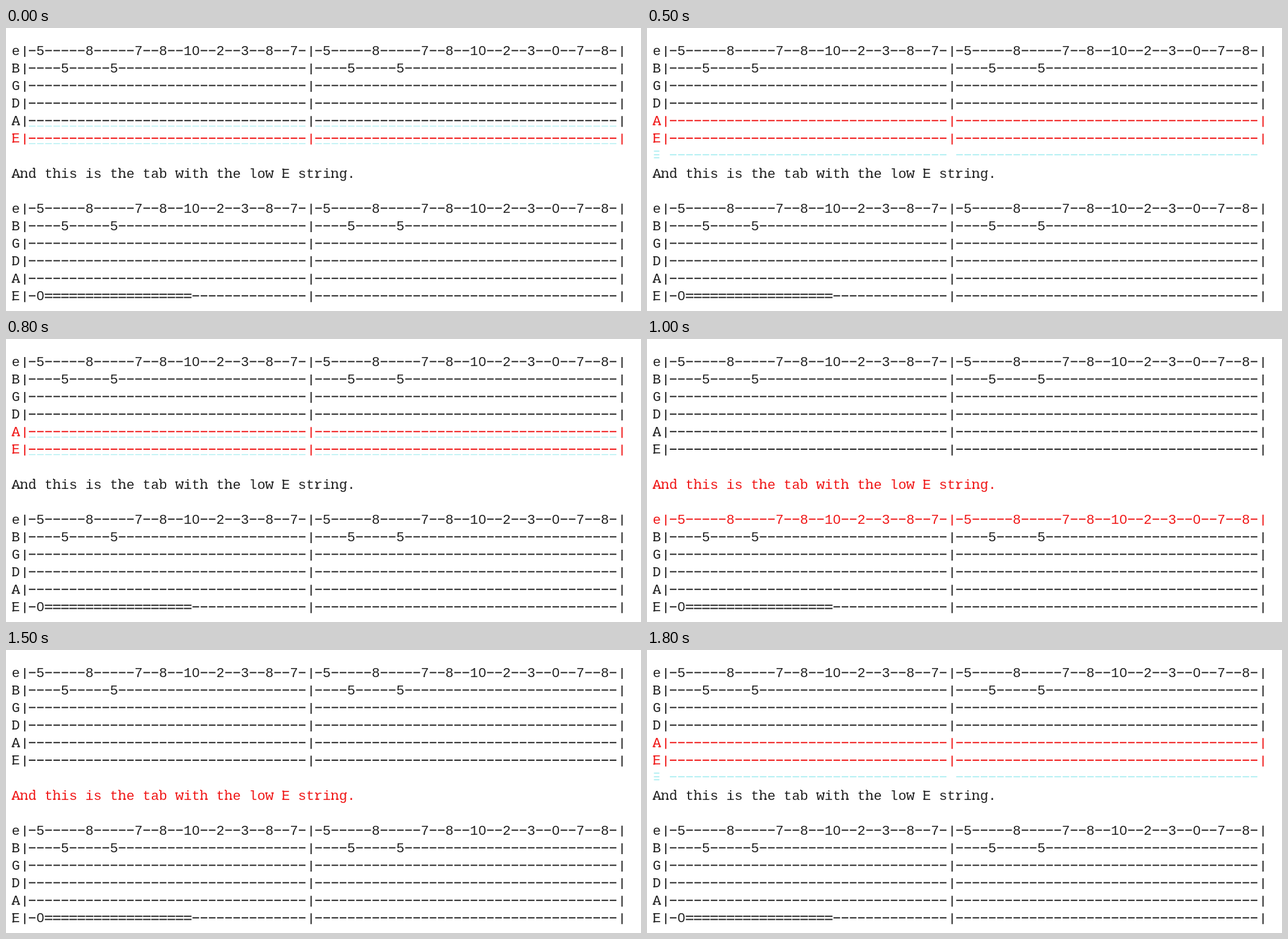
These frames come from a looping animation (1054x470 px, 1900 ms). An HTML page:

```html
<!DOCTYPE html>
<html lang="en">
<head>
<meta charset="utf-8">
<title>Guitar tab</title>
<style>
  html, body { margin: 0; width: 100%; height: 100%; overflow: hidden; background: #fff; }
  svg { display: block; width: 1054px; height: 470px; }
  text { font: 22.63px "Liberation Mono", "Courier New", monospace; white-space: pre; fill: currentColor; }
  .zero { font-family: "Liberation Sans", Arial, sans-serif; text-anchor: middle; }
  path { fill: none; stroke: currentColor; stroke-width: 2; }
  .ghost path { stroke-width: 1.3; }
</style>
</head>
<body>
<svg id="stage" viewBox="0 0 1054 470"></svg>
<script>
const NS = "http://www.w3.org/2000/svg";
const stage = document.getElementById("stage");
const LEFT = 9.6, CELL = 13.58, TOP = 37.4, LEAD = 29.1, BASE = 7.4;
const INK = "#222", RED = "#f01818", CYAN = "#9aeaee", PALE = "#b4eff2";

const dash = n => "-".repeat(n);
const empty = s => `${s}|${dash(34)}|${dash(37)}|`;
const tab = low => [
  "e|-5-----8-----7--8--10--2--3--8--7-|-5-----8-----7--8--10--2--3--0--7--8-|",
  `B|----5-----5${dash(23)}|----5-----5${dash(26)}|`,
  empty("G"), empty("D"), empty("A"), low
];
const lines = [
  ...tab(empty("E")), "",
  "And this is the tab with the low E string.", "",
  ...tab(`E|-0${"=".repeat(18)}${dash(14)}|${dash(37)}|`)
];

// Slab feet per letter: x, width, height above the baseline
const slab = [[0.8, 3, 0.8], [0.8, 3, 14]];
const feet = [[0.4, 4.6, 0.8], [8.4, 4.6, 0.8]];
const serifs = {
  A: [[0, 4.4, 0.8], [9.2, 4.4, 0.8]],
  B: slab, D: slab, E: slab,
  n: [...feet, [0.4, 2, 11]],
  h: [...feet, [0.4, 2, 15.5]],
  d: [[7.8, 3, 15.5], [10, 2.8, 0.8]],
  r: [[1.2, 6.6, 0.8], [1, 2, 11]],
  b: [[0.2, 2, 15.5]],
  w: [[-0.2, 4, 11], [9.8, 4, 11]],
  g: [[10, 2.8, 11]]
};

function add(parent, tag, attrs, text) {
  const el = document.createElementNS(NS, tag);
  for (const k in attrs) el.setAttribute(k, attrs[k]);
  if (text) el.textContent = text;
  parent.append(el);
  return el;
}

const cellX = i => LEFT + i * CELL;
const rule = (x, y, w) => `M${x.toFixed(2)} ${y.toFixed(2)}h${w}`;

function marks(ch, x, y) {
  if (ch === "-") return rule(x + 1.2, y, 11);
  if (ch === "=") return rule(x + 0.5, y - 2.6, 12.6) + rule(x + 0.5, y + 2.6, 12.6);
  if (ch === "|") return `M${x + CELL / 2 + 1.2} ${y - 7.5}v18`;
  return (serifs[ch] || []).map(([dx, w, up]) => rule(x + dx, y + BASE - up, w)).join("");
}

const rows = lines.map((line, r) => {
  const y = TOP + r * LEAD;
  const g = add(stage, "g", {});
  add(g, "text", { x: LEFT, y: y + BASE }, line.replace(/[-|=0]/g, "\u00a0"));
  let d = "";
  [...line].forEach((ch, i) => {
    d += marks(ch, cellX(i), y);
    if (ch === "0") add(g, "text", { class: "zero", x: cellX(i) + CELL / 2, y: y + BASE }, ch);
  });
  add(g, "path", { d });
  return g;
});

function ghost(y, color, label) {
  const g = add(stage, "g", { class: "ghost", color });
  let d = label ? [-6, 0, 5].map(dy => rule(11.5, y + dy, 9)).join("") : "";
  [...empty("E")].forEach((ch, i) => { if (ch === "-") d += marks(ch, cellX(i), y); });
  add(g, "path", { d });
  return g;
}
const ghosts = {
  near: [ghost(163, PALE), ghost(192, PALE)],
  mid: [ghost(169, PALE), ghost(198, PALE)],
  far: [ghost(210.5, CYAN, true)]
};

// Red rows and afterimage for each 100 ms step
const A = 4, E = 5, S = 7, HIGH = 9;
const steps = [
  [[E], "near"], [[E], "far"], [[S, HIGH]], [[], "far"], [[A]],
  [[A, E], "far"], [[E], "far"], [[A]], [[A, E], "near"], [[S]],
  [[S, HIGH]], [[A, E], "near"], [[A, E, S], "mid"], [[S], "near"], [[A, S]],
  [[S]], [[], "far"], [[A, E]], [[A, E], "far"]
];

const start = performance.now();
let shown = -1;
function draw(now) {
  const step = Math.floor(Math.max(0, now - start) / 100) % steps.length;
  if (step !== shown) {
    shown = step;
    const [red, trail] = steps[step];
    rows.forEach((g, r) => g.setAttribute("color", red.includes(r) ? RED : INK));
    for (const k in ghosts)
      ghosts[k].forEach(g => g.setAttribute("visibility", k === trail ? "visible" : "hidden"));
  }
  requestAnimationFrame(draw);
}
draw(start);
</script>
</body>
</html>
```
